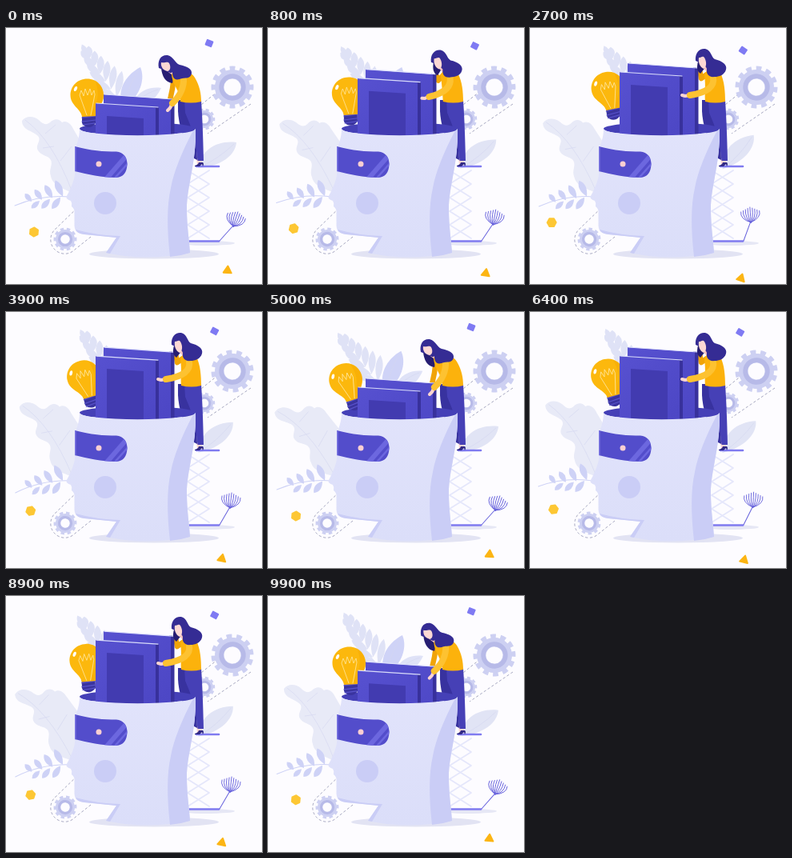
Write an HTML page that moves like this. It is 320 by 320 pixels and loops after 10000 ms.

```html
<!DOCTYPE html>
<html lang="en">
<head>
<meta charset="utf-8">
<title>Filling a head with knowledge</title>
<style>
html, body { margin: 0; width: 100%; height: 100%; overflow: hidden; background: #fdfcff }
svg { display: block; width: 100%; height: 100% }
.line { fill: none; stroke-linecap: round; stroke-linejoin: round }
.belt { fill: none; stroke: #9c9db9; stroke-width: .9; stroke-dasharray: 3.2 2.6 }
.vein { fill: none; stroke: #d3d6f0; stroke-width: .6 }
</style>
</head>
<body>
<svg viewBox="0 0 320 320">
  <defs>
    <linearGradient id="skull" x1="0" y1="0" x2="0" y2="1">
      <stop offset="0" stop-color="#e1e3fb"/><stop offset="1" stop-color="#dbdef9"/>
    </linearGradient>
    <linearGradient id="cover" x1="0" y1="0" x2="1" y2="1">
      <stop offset="0" stop-color="#5751d0"/><stop offset="1" stop-color="#4c46c4"/>
    </linearGradient>
    <clipPath id="visorClip"><use href="#visor"/></clipPath>
  </defs>

  <!-- plants -->
  <g id="oakLeaf">
    <path fill="#e8eaf7" d="M84 207C76 202 58 198 56 185C53 177 59 171 56 165C53 159 44 160 40 153C36 146 45 141 40 135C33 128 20 128 20 116C25 109 35 110 41 115C46 120 50 122 55 118C61 112 67 114 70 118C75 115 81 119 84 126L98 150V200Z"/>
    <path class="vein" d="M24 115Q58 140 82 203M49 132L62 121M60 148L46 150M68 166L82 148"/>
  </g>
  <g id="fern" fill="#dfe2f6"></g>
  <g id="topLeaves">
    <path fill="#cfd3f7" d="M144 92C140 74 152 57 168 49C174 63 168 81 156 92Z"/>
    <path fill="#dfe2f7" d="M160 92C166 78 180 73 194 75C190 83 186 88 180 92Z"/>
    <path class="vein" d="M149 92Q155 68 166 53M164 91Q178 80 190 77"/>
  </g>
  <g id="sideLeaf">
    <path fill="#e1e4f5" d="M240 175C244 152 264 140 288 143C287 158 270 173 240 175Z"/>
    <path class="vein" d="M242 174Q265 164 285 145"/>
  </g>
  <g id="branch" fill="#ced2f6"><path class="line" stroke="#ced2f6" d="M80 211Q44 208 11 222"/></g>

  <!-- shadows -->
  <ellipse cx="185" cy="282.500" rx="81" ry="6" fill="#e2e3f3"/>
  <ellipse cx="250" cy="269" rx="36" ry="3" fill="#e6e7f5"/>

  <!-- machinery -->
  <path class="belt" d="M265 79L239 100M306 95L252 132"/>
  <path class="belt" d="M106 261L86 277A17 17 0 0 1 61 252L92 222"/>
  <g id="gears"></g>
  <path id="lift" class="line" stroke="#e5e7fb" stroke-width="1.800"/>
  <path class="line" stroke="#807bf0" stroke-width="2.700" d="M238 173H266M229 266.500H266"/>
  <g id="flower" class="line" stroke="#6661dc">
    <path d="M267 266L284 247"/>
    <path id="fan" stroke-width=".9" transform="rotate(18 284 248)"/>
  </g>

  <!-- legs -->
  <path fill="#fbd6d3" d="M238 163H245V171H239Z"/>
  <path fill="#312a86" d="M236 172Q240 171 241 168L246 168Q248 170 246 173L245 170L242 173H236Z"/>
  <path fill="#38329f" d="M215 90H236L239 165L233 162Q216 128 215 104Z"/>
  <path fill="#4640b6" d="M223 90H244Q246 120 247 166H239.500Q237 134 224 106Z"/>

  <!-- head contents -->
  <ellipse cx="164.500" cy="126" rx="72.500" ry="8.200" fill="#4540b7"/>
  <g id="bulb">
    <path fill="#3a349f" d="M95 107H112V119Q108 124 104 124Q98 124 95 119Z"/>
    <path class="line" stroke="#5a54cb" stroke-width="1.200" d="M95 112L112 110M95 117L112 115M96 121L111 119"/>
    <path fill="#fcb80d" d="M101.500 63.500C114 63.500 122 73 122 84C122 96 113 100 112.500 110L95 111C94 101 80.500 97 80.500 84C80.500 73 89 63.500 101.500 63.500Z"/>
    <path fill="#f5a800" d="M112 67C119 71 122 78 122 84C122 96 113 100 112.500 110H107C109 97 120 90 112 67Z" opacity=".5"/>
    <path class="line" stroke="#ffe7a0" stroke-width=".8" d="M101 109L92 84L94 78L97 85L99 76L102 84L105 76L107 84L110 78L111 83L106 109"/>
    <ellipse cx="87" cy="76" rx="1.800" ry="3.200" fill="#fff" transform="rotate(25 87 76)"/>
  </g>
  <path id="backArm" class="line" stroke="#f0a408" stroke-width="6.500"/>
  <g id="books">
    <path fill="#38319c" d="M204 88L210.500 89V180H204Z"/>
    <path fill="url(#cover)" d="M122 83L206 89V180H122Z"/>
    <path class="line" stroke="#dfe1fc" stroke-width="1.200" d="M123 83L209 89"/>
    <path fill="#38319c" d="M185 99L191 99.500V180H185Z"/>
    <path fill="url(#cover)" d="M112 94L187 99.500V180H112Z"/>
    <path class="line" stroke="#d9dcfa" stroke-width="1.200" d="M113 94L190 99"/>
    <path fill="#423bb0" d="M126 110L172 113V180H126Z"/>
  </g>

  <!-- head -->
  <path fill="url(#skull)" d="M92 126C92 138 88 144 87 152L86 184C84 195 79 204 75.500 211Q75 214 81 216Q83 219 82 223Q86 226 85.500 231V247C86 254 89 257 98 258L138 262L125 281Q174 292 230 281C229 264 226 248 226 226C226 198 238 168 237 126A72.500 8.200 0 0 1 92 126Z"/>
  <path fill="#cacdf6" d="M237 126C238 168 226 198 226 226C226 248 229 264 230 281Q218 285 205 286C201 250 201 222 206 200C210 178 221 153 233 130Z"/>
  <path fill="#cacdf6" d="M87 252Q89 257 98 258L138 262L125 281L130 282L143 260Q112 259 87 252Z"/>
  <path id="visor" fill="#534dcb" d="M86 148C106 153.500 122 154.500 138 154.500Q151 156 151.500 170Q151 186 138 187C119 187 103 183 86 179Z"/>
  <g clip-path="url(#visorClip)">
    <path stroke="#6c67df" stroke-width="6" d="M124 190L152 158"/>
    <path stroke="#6c67df" stroke-width="2.500" d="M133 191L156 165"/>
    <path stroke="#7a75e2" stroke-width="3" d="M86 146V182"/>
  </g>
  <circle cx="116" cy="170" r="3.500" fill="#fbcfd2"/>
  <circle cx="124" cy="219" r="14" fill="#cacdf6"/>

  <!-- upper body -->
  <path id="farHair" fill="#261d72"/>
  <path id="neck" class="line" stroke="#f6c3c0" stroke-width="5"/>
  <path id="torso" fill="#fcb20c"/>
  <path id="hand" class="line" stroke="#fdd5d0" stroke-width="4"/>
  <path id="arm" class="line" stroke="#fdc231" stroke-width="8"/>
  <path id="hair" fill="#352c94"/>
  <path id="face" fill="#fdd8d4"/>

  <!-- floating bits -->
  <rect id="square" x="-4.500" y="-4" width="9" height="8" rx="1" fill="#7f7af3"/>
  <path id="hexagon" fill="#fdc734" stroke="#fdc734" stroke-width="2" stroke-linejoin="round" d="M5.500 0L2.750 4.800H-2.750L-5.500 0L-2.750-4.800H2.750Z"/>
  <path id="triangle" fill="#fcb514" stroke="#fcb514" stroke-width="2" stroke-linejoin="round" d="M0-4.500L5 4H-5Z"/>
</svg>
<script>
const $ = id => document.getElementById(id);
const attr = (id, name, value) => $(id).setAttribute(name, value);
const move = (id, value) => attr(id, 'transform', value);
const add = (id, markup) => $(id).insertAdjacentHTML('beforeend', markup);
const TAU = Math.PI * 2;

// Pointed leaf that grows from (x, y) in the direction of angle
const leaflet = (x, y, length, width, angle) =>
  `<path transform="translate(${x} ${y}) rotate(${angle})"
    d="M0 0Q${length * .6} ${-width} ${length} 0Q${length * .6} ${width} 0 0"/>`;

// Leaflets in pairs along a curved stem
add('fern', '<path class="line" stroke="#dfe2f6" stroke-width="1.500" d="M146 96Q119 70 101 32"/>');
for (let i = 0; i < 6; i++) {
  const x = 138 - i * 6.8, y = 86 - i * 9.6;
  add('fern', leaflet(x, y, 29 - i * 3, 9, 202 + i * 4) +
              leaflet(x, y, 33 - i * 3.5, 9, 282 - i * 3));
}
add('fern', leaflet(102, 36, 17, 7, 245));

for (let i = 0; i < 4; i++) {
  const x = 32 + i * 13, y = 217 - i * 2.2;
  add('branch', leaflet(x, y, 13 + i * 3, 6.5 + i * .6, 230 + i * 5));
  if (i < 3) add('branch', leaflet(x + 10, y - 1, 14 + i * 2, 6.5 + i * .6, 138 - i * 6));
}

const gears = [[283, 74, 22, 12], [248, 114, 11, 10], [74, 264, 12, 10]];
gears.forEach(([x, y, r, teeth], i) => add('gears', `<g id="gear${i}" fill="none">
  <circle cx="${x}" cy="${y}" r="${r * 1.08}" stroke="#cdd0f2" stroke-width="${r * .25}"
    pathLength="${teeth * 2}" stroke-dasharray="1.1 .9" stroke-dashoffset=".55"/>
  <circle cx="${x}" cy="${y}" r="${r * .74}" stroke="#cdd0f2" stroke-width="${r * .52}"/>
  <circle cx="${x}" cy="${y}" r="${r * .63}" stroke="#b7bae8" stroke-width="${r * .26}"/></g>`));

let lift = '';
for (let y = 178; y < 260; y += 17) lift += `M227 ${y}L254 ${y + 17}M254 ${y}L227 ${y + 17}`;
attr('lift', 'd', lift);

let fan = '';
for (let i = -4; i <= 4; i++)
  fan += `M284 248Q${284 + i * 3.4} 243 ${284 + i * 2.9} ${229 + Math.abs(i) * 1.3}`;
attr('fan', 'd', fan);

// Each part bends from leaning over to standing upright
const poses = {
  farHair: ['M194 50C195 60 199 68 208 69L211 52Z', 'M210 42C208 50 209 54 213 57L221 47Z'],
  backArm: ['M210 60L208 76L205 90', 'M224 56L214 63L212 52'],
  neck: ['M203 52L211 58', 'M218 47L224 55'],
  torso: ['M207 58C213 49 231 53 236 62C242 72 244 82 244 92Q231 95 218 92C219 80 208 72 207 58Z',
          'M218 59C220 50 233 49 238 56C243 66 244 80 244 92Q232 95 219 92C218 82 220 74 218 59Z'],
  arm: ['M222 62Q223 80 208 94', 'M229 62Q232 79 200 84'],
  hand: ['M208 94L205 100L202 103', 'M200 84L194 85L190 84'],
  hair: ['M191 50C189 40 194 33 202 34C210 36 211 44 217 46C226 48 233 51 232 57C230 65 223 61 217 64C209 66 208 60 208 55C206 58 203 54 191 50Z',
         'M207 41C206 31 212 25 219 26C227 28 226 36 231 39C240 41 247 46 245 52C243 59 236 61 231 61C223 62 220 57 221 51C220 48 217 45 207 41Z'],
  face: ['M194 43C199 44 202 41 204 44C206 48 206 53 202 54C197 53 193 49 194 43Z',
         'M211 37C214 37 216 34 218 37C221 42 221 49 217 51C213 49 210 44 211 37Z']
};
const numbers = /\d+/g;
function blend([from, to], k) {
  const ends = to.match(numbers);
  let i = 0;
  return from.replace(numbers, n => (+n + (ends[i++] - n) * k).toFixed(2));
}

const smooth = k => (k = Math.min(1, Math.max(0, k)), k * k * (3 - 2 * k));
const wave = (t, period) => (1 - Math.cos(TAU * t / period)) / 2;

function draw(t) {
  const half = t % 5;
  const lift = smooth(Math.min(half, 5 - half) / 1.12);
  const drift = Math.sin(Math.PI * half / 5) ** 1.4;
  const sway = wave(t, 10 / 3);
  const rise = wave(t, 5);

  move('books', `translate(0 ${-39 * lift})`);
  for (const id in poses) attr(id, 'd', blend(poses[id], lift));

  move('bulb', `translate(${-1.5 * rise} ${-9 * rise}) rotate(${-15 * wave(t, 10)} 102 100)`);
  move('oakLeaf', `rotate(${-8.5 * sway} 80 200)`);
  move('fern', `rotate(${-6 * sway} 142 95)`);
  move('topLeaves', `rotate(${-2 * sway} 160 95)`);
  move('branch', `rotate(${3.5 * Math.sin(TAU * t / 5)} 78 211)`);
  move('sideLeaf', `rotate(${-14 * drift} 246 173)`);
  move('flower', `rotate(${-22 * drift} 267 266)`);
  gears.forEach(([x, y], i) => move('gear' + i, `rotate(${36 * t} ${x} ${y})`));

  move('square', `translate(${254 + 12.5 * drift} ${19 + 9.2 * drift}) rotate(${22 + 12 * drift})`);
  move('hexagon', `translate(${35 - 8 * drift} ${255 - 12 * drift}) rotate(${-25 + 25 * drift})`);
  move('triangle', `translate(${277 - 13 * drift} ${302 + 10 * drift}) rotate(${4 + 14 * drift})`);
}

const start = performance.now();
(function tick() {
  draw((performance.now() - start) / 1000 % 10);
  requestAnimationFrame(tick);
})();
</script>
</body>
</html>
```
